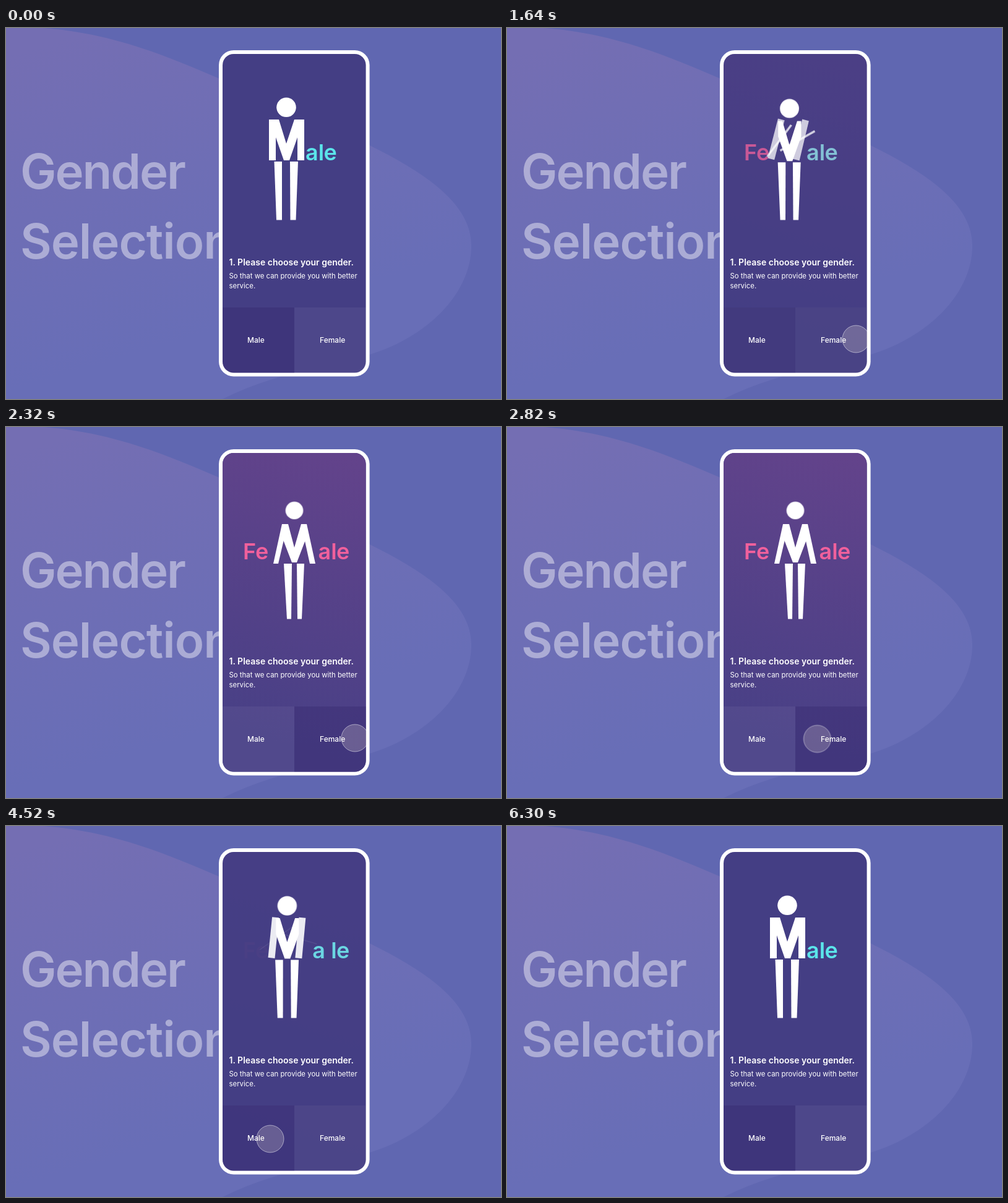
An HTML page for the animation above (7.74 s loop, 800x600 px).

```html
<!DOCTYPE html>
<html lang="en">
<head>
<meta charset="utf-8">
<title>Gender Selection</title>
<style>
html, body { margin: 0; width: 100%; height: 100%; overflow: hidden; background: #6067b1; }
svg { display: block; width: 800px; height: 600px; font-family: Inter, "Open Sans", sans-serif; fill: #fff; }

.title { font-size: 78px; font-weight: 600; letter-spacing: -2px; opacity: .43; }
.title.wide { letter-spacing: -1px; }
.word { font-size: 36px; font-weight: 600; }
.question { font-size: 14px; font-weight: 600; }
.hint { font-size: 11.4px; font-weight: 400; }
.label { font-size: 12px; font-weight: 500; }

/* Each part has a male look (--m) and a female look (--f). */
.shape, .tint, .fade, .arm, .sleeve, .head {
  animation: 7740ms cubic-bezier(.2, 1, .3, 1) infinite both;
}
.shape { animation-name: shape; }
.tint { animation-name: tint; }
.fade { animation-name: fade; }
.fade.quick { animation-timing-function: cubic-bezier(0, 1, 0, 1); }
.head { animation-name: turn; }
.arm { animation-name: turn, vanish; }
.sleeve { animation-name: unfold; }
.arm, .sleeve, .head { transform-box: fill-box; transform-origin: center; }
.slide { animation: slide 7740ms ease var(--delay) infinite both; }
.touch { animation: touch 7740ms linear infinite both; }

@keyframes shape {
  0%, 20.672%, 63.049%, to { d: var(--m); }
  29.974%, 56.072% { d: var(--f); }
}
@keyframes tint {
  0%, 20.672%, 63.049%, to { fill: var(--m); }
  29.974%, 56.072% { fill: var(--f); }
}
@keyframes turn {
  0%, 20.672%, 63.049%, to { transform: none; }
  29.974%, 56.072% { transform: var(--f); }
}
@keyframes fade {
  0%, 20.672%, 63.049%, to { opacity: 0; }
  29.974%, 56.072% { opacity: 1; }
}
@keyframes vanish {
  0%, 20.672%, 63.049%, to { opacity: 1; }
  29.974%, 56.072% { opacity: 0; }
}
@keyframes unfold {
  0%, 20.672%, 63.049%, to { transform: var(--m); opacity: 0; }
  22.997% { transform: var(--q); opacity: 1; }
  29.974%, 56.072% { transform: translate(0, 0) rotate(0deg) scaleX(1); opacity: 1; }
}
@keyframes slide {
  0%, 20.672%, 59.948%, to { transform: none; }
  25.84%, 56.072% { transform: translateX(20.5px); }
}
@keyframes touch {
  0%, 9.302% { transform: translate(601px, 624px); animation-timing-function: ease-out; }
  12.145%, 31.783% { transform: translate(564px, 503px); animation-timing-function: ease-in-out; }
  41.602%, 80.62% { transform: translate(427px, 506px); animation-timing-function: linear; }
  81.137% { transform: translate(466px, 558px); animation-timing-function: step-end; }
  81.395%, to { transform: translate(601px, 624px); }
}
</style>
</head>
<body>
<svg viewBox="0 0 800 600">
  <defs>
    <linearGradient id="blob" gradientUnits="userSpaceOnUse" x1="150" y1="0" x2="300" y2="500">
      <stop stop-color="#746eb3"/><stop offset="1" stop-color="#686eb7"/>
    </linearGradient>
    <linearGradient id="plum" gradientUnits="userSpaceOnUse" x1="560" y1="42" x2="410" y2="500">
      <stop stop-color="#63438b"/><stop offset="1" stop-color="#484086"/>
    </linearGradient>
    <clipPath id="screen"><rect x="350" y="42" width="231.6" height="515.6" rx="18"/></clipPath>
  </defs>

  <rect width="800" height="600" fill="#6067b1"/>
  <path fill="url(#blob)" d="M0 0H60C170 8 260 45 345 82C430 120 500 148 588 190C690 240 752 290 752 352C752 430 680 500 588 528C520 545 430 560 350 600H0Z"/>
  <text class="title" x="23" y="260">Gender</text>
  <text class="title wide" x="23" y="373">Selection</text>

  <rect x="344" y="36" width="243.6" height="527.6" rx="24"/>
  <g clip-path="url(#screen)">
    <rect x="350" y="42" width="232" height="516" fill="#443e84"/>
    <rect class="fade" x="350" y="42" width="232" height="516" fill="url(#plum)"/>
    <rect class="tint" x="350" y="452" width="116" height="106" style="--m:rgba(55,40,110,.4);--f:rgba(255,255,255,.05)"/>
    <rect class="tint" x="466" y="452" width="116" height="106" style="--m:rgba(255,255,255,.05);--f:rgba(55,40,110,.4)"/>
  </g>

  <g class="word">
    <text class="fade quick" x="383" y="214" fill="#f0609c">Fe</text>
    <g class="tint" style="--m:#5be4ea;--f:#f0609c">
      <text class="slide" style="--delay:100ms" x="484" y="214">a</text>
      <text class="slide" style="--delay:180ms" x="504.7" y="214">l</text>
      <text class="slide" style="--delay:240ms" x="513.5" y="214">e</text>
    </g>
  </g>

  <circle class="head" cx="453" cy="128.3" r="15.8" style="--f:translate(13px,6.7px) scale(.905)"/>
  <path class="shape" style="--m:path('M435 148L441 148L453 187L466 148L472 148L472 174L458 214L449 214L435 174Z');--f:path('M447 157L456 157L466 195L477 157L485 157L485 180L470 219L462 219L447 180Z')"/>
  <path class="shape" style="--m:path('M433.5 216L446 216L446 310.5L437 310.5Z');--f:path('M449 221L462 221L461 310.5L454 310.5Z')"/>
  <path class="shape" style="--m:path('M459 216L472 216L468.5 310.5L459.5 310.5Z');--f:path('M470 221L482 221L478 310.5L471 310.5Z')"/>
  <rect class="arm" x="425" y="148" width="11" height="66" style="--f:translate(17px,-4px) rotate(54deg)"/>
  <rect class="arm" x="471" y="148" width="11" height="66" style="--f:translate(-6px,0) rotate(50deg)"/>
  <path class="sleeve" d="M446 157H455L440 221H432Z" style="--m:translate(-8px,-8px) rotate(60deg) scaleX(0);--q:translate(-2px,-6px) rotate(24deg) scaleX(.5)"/>
  <path class="sleeve" d="M477 157H486L500 221H491Z" style="--m:translate(-19px,-8px) rotate(120deg) scaleX(0);--q:translate(-19px,-6px) rotate(49deg) scaleX(.5)"/>

  <text class="question" x="360.5" y="384">1. Please choose your gender.</text>
  <text class="hint" x="360.5" y="405">So that we can provide you with better</text>
  <text class="hint" x="360.5" y="421">service.</text>
  <text class="label" x="390" y="509">Male</text>
  <text class="label" x="507" y="509">Female</text>

  <circle class="touch" r="22" fill="rgba(255,243,230,.21)" stroke="rgba(255,255,255,.5)"/>
</svg>
</body>
</html>
```
